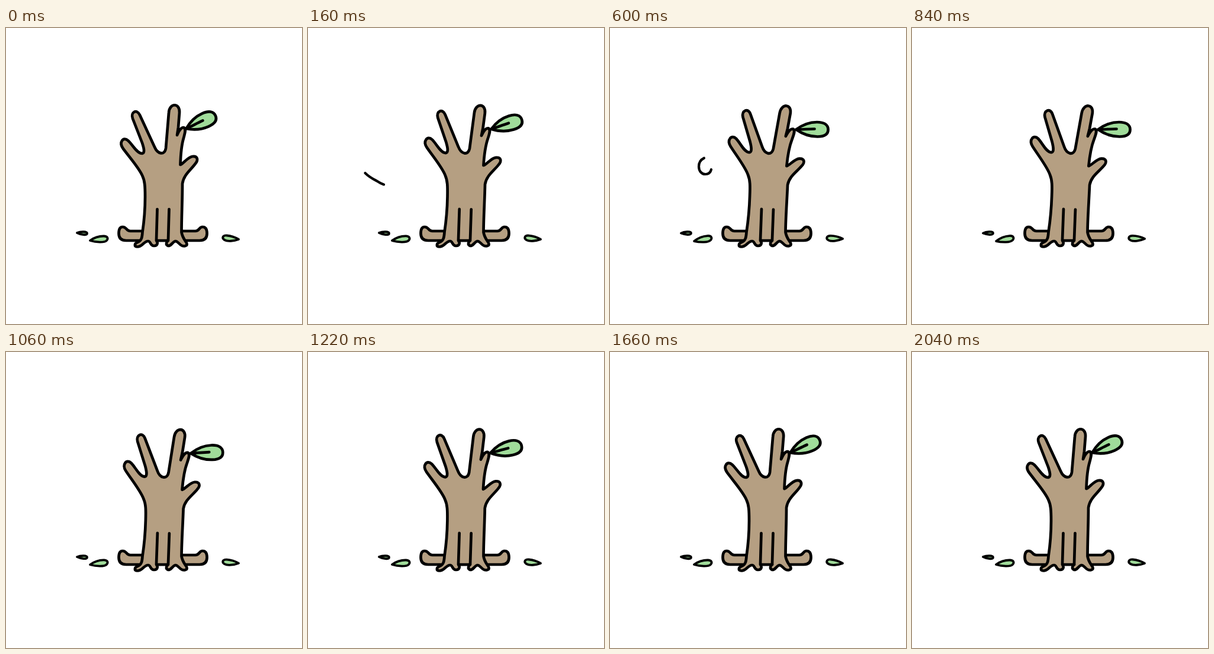
Animation, 500 px wide and 500 px high, one loop 2420 ms. Source, as an HTML page:

```html
<!DOCTYPE html>
<html lang="en">
<head>
<meta charset="utf-8">
<title>Tree in the wind</title>
<style>
  html, body { margin: 0; width: 100%; height: 100%; overflow: hidden; background: #fff; }
  svg { display: block; width: 100vw; height: 100vh; }
  path { stroke: #000; stroke-width: 4.7; stroke-linecap: round; stroke-linejoin: round; }
  .bark { fill: #b59f82; }
  .leaf { fill: #a0dc9a; }
  .line { fill: none; }
  .litter { stroke-width: 3.8; }
  #wind { stroke-width: 4.2; }
</style>
</head>
<body>
<svg viewBox="0 0 500 500">
  <path class="bark" d="M231 343L210 343C203 343 204 336 197 336C191 336 190.5 342 190.5 347C190.5 355 195 359 203 359L327 359C335 359 339.5 355 339.5 347C339.5 341 338 336 332 336C326 336 327 343 320 343Z"/>
  <path id="trunk" class="bark"/>
  <path id="grooves" class="line"/>
  <g id="topLeaf">
    <path class="leaf" d="M0 0C12 -9 24 -12.5 35 -12.5C47 -12.5 54 -8 54 0C54 9 46 12 36 12C22 12 10 7 0 0Z"/>
    <path class="line" d="M0 0C10 0 20 -1 31 -1"/>
  </g>
  <g id="litter">
    <path class="leaf litter" d="M120 346C125 344 137 343 137 347C137 351 126 349 120 346Z"/>
    <path class="leaf litter" d="M142 359C149 354 157 351.5 165 351.5C172 351.5 173 356 170 359C166 363 152 362 142 359Z"/>
    <path class="leaf litter" d="M393 357C388 354 379 351 373 350.5C366 350 364 355 369 358C374 361 385 360 393 357Z"/>
  </g>
  <path id="wind" class="line" pathLength="1" d="M104 245C110 251 117 255 123 258C132 264 141 267 150 267C167 267 179 257 179 241C179 227 170 218 158 218C147 218 141 226 141 234C141 242 146 247 152 247C158 247 161 243 162 239"/>
</svg>
<script>
const LOOP = 2420;
const LEAF_LAG = 40;
const $ = id => document.getElementById(id);

const trunkShape =
  'M230.5 345C233.5 325 235 300 235 285C235 268 234.5 258 230.5 250C226 238 210 220 198 204' +
  'C190 193 198 183 206 190C214 197 221 212 230 212C235 211 233 203 230 194' +
  'L214 153C210 142 221 136 226 147L251 201C256 213 268 216 270 203' +
  'L275 143C276 126 294 126 293 143L291 168L289 181C291 177 294 168 300 168' +
  'C305 170 302 178 300 186C297 196 295 215 294.5 231C300 229 307 218 315 217' +
  'C324 216 325 223 320 229C312 240 300 248 298 263C298 290 296.5 320 296.5 345' +
  'C298 354 302 358 305 363C307 368 302 369 298 368C292 366 291 360 286 360' +
  'C281 361 280 368 274 368C269 366 271 361 274 359L254 359' +
  'C257 363 256 368 250 368C243 368 245 360 240 360C233 360 230 370 222 369.5' +
  'C216 369 217 364 222 362C229 360 230 353 230.5 345Z';
const grooveShape = 'M254 358L255.5 306M274 358L275.5 306';

const clamp = v => Math.min(1, Math.max(0, v));
const span = (t, from, to) => clamp((t - from) / (to - from));
const sineInOut = p => (1 - Math.cos(Math.PI * p)) / 2;
const quadInOut = p => p < 0.5 ? 2 * p * p : 1 - 2 * (1 - p) ** 2;
const lean = t => t < 1000 ? quadInOut(span(t, 0, 320)) : (1 - span(t, 1000, 2000)) ** 4;

// Leans every point to the right, more so the higher it stands.
function bend(shape, k) {
  return shape.replace(/([\d.]+) ([\d.]+)/g, (_, a, b) => {
    const x = +a, y = +b;
    const u = Math.max(0, (343 - y) / 215);
    const dx = 13.3 * u ** 1.9;
    const dy = (x - 258) * 0.15 * u * (1.3 - u);
    return (x + k * dx).toFixed(2) + ' ' + (y + k * dy).toFixed(2);
  });
}

function drawTree(t) {
  const k = lean(t);
  const turn = -24 * (1 - lean(t - LEAF_LAG));
  $('trunk').setAttribute('d', bend(trunkShape, k));
  $('grooves').setAttribute('d', bend(grooveShape, k));
  $('topLeaf').setAttribute('transform',
    `translate(${304.5 + 10 * k} ${170 + 1.5 * k}) rotate(${turn})`);
}

const pivots = [[129, 347], [158, 357], [378, 355]];
function drawLitter(t) {
  const gust = sineInOut(span(t, 0, 240)) * (1 - sineInOut(span(t, 960, 1090)));
  const angle = gust * (-4 + 4 * Math.sin(2 * Math.PI * t / 120));
  pivots.forEach(([x, y], i) =>
    $('litter').children[i].setAttribute('transform', `rotate(${angle} ${x} ${y})`));
}

function drawWind(t) {
  const head = sineInOut(span(t, 20, 502));
  const tail = sineInOut(span(t, 233, 795));
  const wind = $('wind');
  wind.style.display = head - tail > 0.002 ? '' : 'none';
  wind.setAttribute('stroke-dasharray', `${Math.max(0, head - tail)} 2`);
  wind.setAttribute('stroke-dashoffset', -tail);
  wind.setAttribute('transform', `translate(${9 * (t - 360) / 240} 0)`);
}

function draw(now) {
  const t = Math.max(0, now - start) % LOOP;
  drawTree(t);
  drawLitter(t);
  drawWind(t);
  requestAnimationFrame(draw);
}

const start = performance.now();
draw(start);
</script>
</body>
</html>
```
